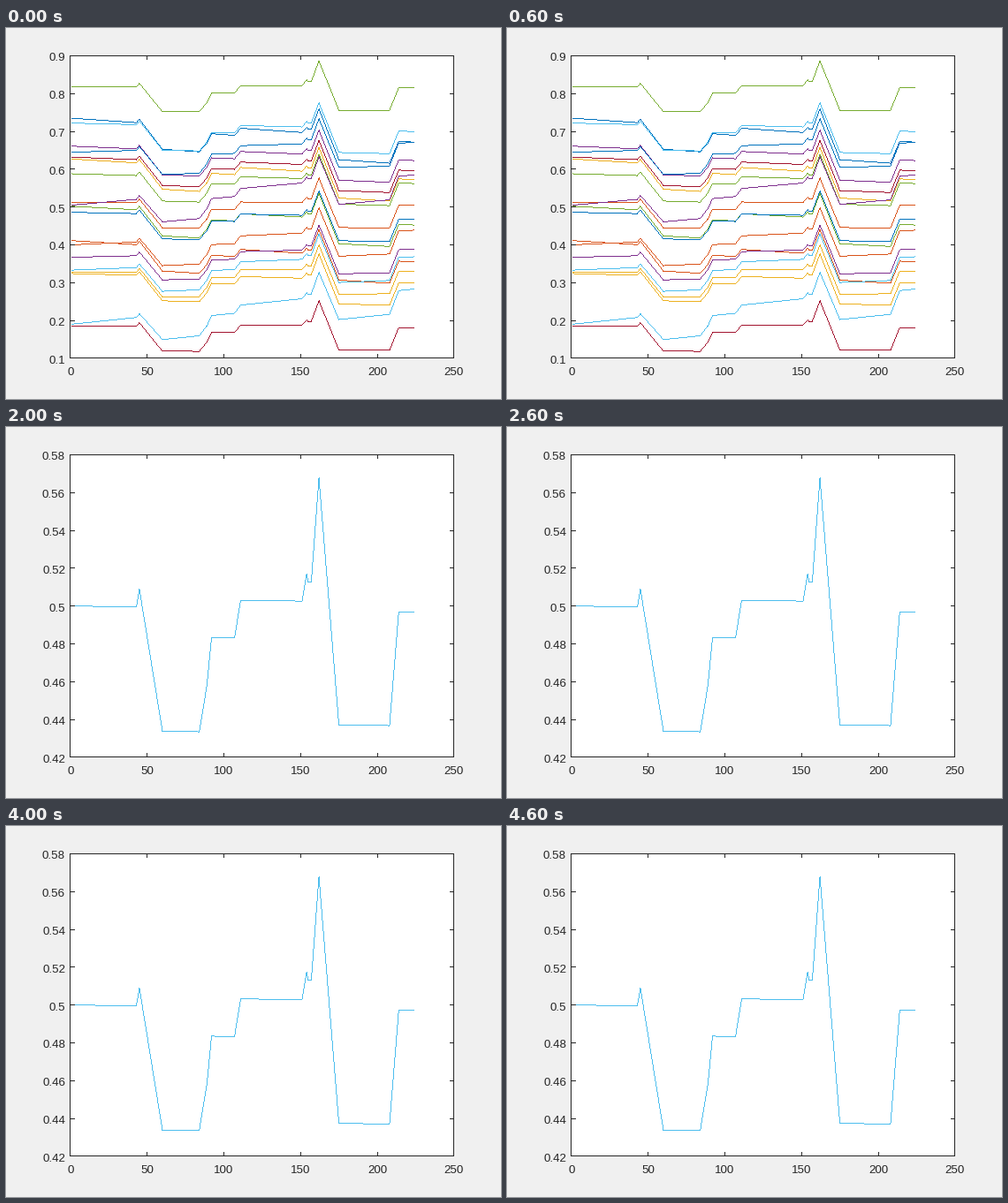
Write a matplotlib script that moves like this. It is 560 by 420 pixels and loops after 5 s.

```python
import numpy as np
import matplotlib.pyplot as plt
from matplotlib.animation import FuncAnimation
from matplotlib.colors import to_rgb

W, H, DPI = 560, 420, 100
LEFT, RIGHT, TOP, BOTTOM = 72.8, 506.8, 31.5, 373.8
TICK = 4.3


def rgb(color):
    return np.round(np.array(to_rgb(color)) * 255).astype(np.uint8)


INK, BACK, WHITE = rgb("#262626"), rgb("#f0f0f0"), rgb("white")
CYCLE = [rgb(c) for c in ("#0072bd", "#d95319", "#edb120", "#7e2f8e",
                          "#77ac30", "#4dbeee", "#a2142f")]

# Shared signal: (start, end, level) of each plateau or peak
HOLDS = [(1, 43, .5), (45, 45, .5089), (60, 84, .4337), (89, 89, .4579),
         (92, 107, .4833), (111, 151, .503), (154, 154, .517),
         (155, 157, .5127), (162, 162, .5675), (175, 208, .437),
         (214, 224, .4967)]
SAG = 1.3e-5     # plateaus sink this much per sample
LIFT = 1.6e-4    # rise of the last sample after each round

# First reading of each node, in colour-cycle order
STARTS = [.735, .411, .627, .661, .502, .722, .632, .486, .513, .324,
          .367, .588, .333, .185, .645, .400, .327, .505, .818, .190]

points = [(t, level - SAG * (t - a))
          for a, b, level in HOLDS for t in sorted({a, b})]
T, MEAN = np.array(points).T


def segment(img, x0, y0, x1, y1, color):
    """One-pixel line without smoothing."""
    steep = abs(y1 - y0) > abs(x1 - x0)
    ends = [(y0, x0), (y1, x1)] if steep else [(x0, y0), (x1, y1)]
    (a0, b0), (a1, b1) = sorted(ends)
    a = np.arange(int(a0), int(a1) + 1)
    b = np.interp(a + .5, [a0, a1], [b0, b1]).astype(int)
    img[(a, b) if steep else (b, a)] = color


def x_pos(t):
    return LEFT + (RIGHT - LEFT) * t / 250


def curves(i):
    """(values, colour) of every line to draw in step i."""
    if i > 0:
        return [(MEAN + LIFT * (i - 1) * T / T[-1], CYCLE[5])]
    progress = (T - T[0]) / (T[-1] - T[0])
    lines = []
    for k, start in enumerate(STARTS):
        drift = -.06 + .006 * k + .0026 * k * np.cos(6 * np.pi / 7 * (k - 5.2))
        lines.append((MEAN + start - MEAN[0] + drift * progress, CYCLE[k % 7]))
    return lines


def label(x, y, value, ha):
    fig.text(x / W, 1 - y / H, f"{value:g}", ha=ha, va="baseline",
             color=INK / 255, family="Liberation Sans", size=13.33 * 72 / DPI)


def draw(i):
    lo, hi, step = (.42, .58, .02) if i else (.1, .9, .1)

    def y_pos(v):
        return BOTTOM - (BOTTOM - TOP) * (v - lo) / (hi - lo)

    img = np.full((H, W, 3), BACK)
    img[int(TOP):int(BOTTOM) + 1, int(LEFT):int(RIGHT) + 1] = WHITE
    for values, color in curves(i):
        x, y = x_pos(T), y_pos(values)
        for seg in zip(x, y, x[1:], y[1:]):
            segment(img, *seg, color)

    for text in list(fig.texts):
        text.remove()
    for t in range(0, 251, 50):
        x = x_pos(t)
        segment(img, x, TOP, x, TOP + TICK, INK)
        segment(img, x, BOTTOM - TICK, x, BOTTOM, INK)
        label(x, 393, t, "center")
    for v in np.round(np.arange(lo, hi + step / 2, step), 2):
        y = y_pos(v)
        segment(img, LEFT, y, LEFT + TICK, y, INK)
        segment(img, RIGHT - TICK, y, RIGHT, y, INK)
        label(67, y + 5.9, v, "right")
    for y in (TOP, BOTTOM):
        segment(img, LEFT, y, RIGHT, y, INK)
    for x in (LEFT, RIGHT):
        segment(img, x, TOP, x, BOTTOM, INK)
    plot.set_data(img)
    return []


fig = plt.figure(figsize=(W / DPI, H / DPI), dpi=DPI, facecolor="#f0f0f0")
plot = fig.figimage(np.full((H, W, 3), BACK), origin="upper")
anim = FuncAnimation(fig, draw, frames=5, interval=1000, init_func=lambda: [],
                     repeat=True, repeat_delay=0, blit=False)
plt.show()
```
